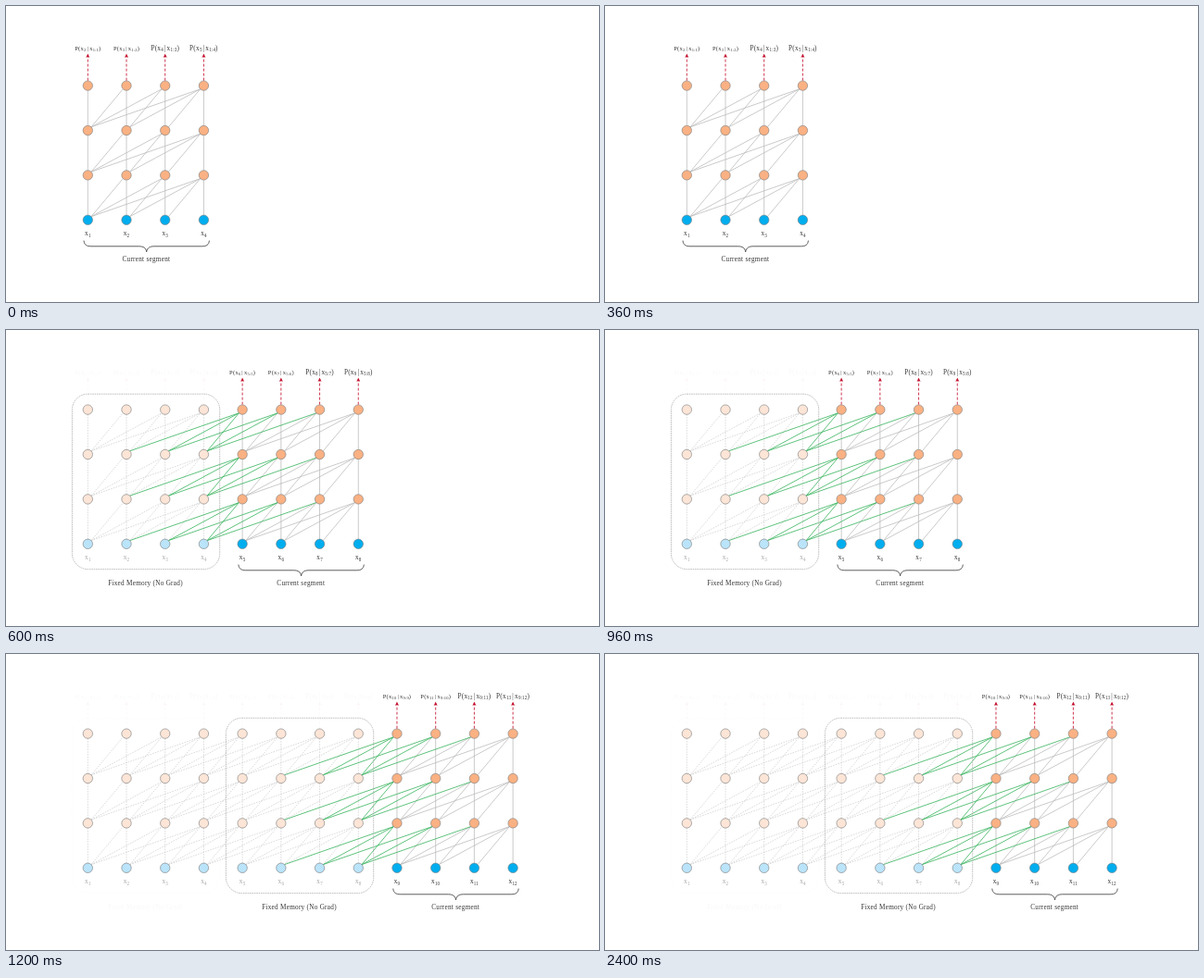
These frames come from a looping animation (640 by 320 pixels, 3.2 s). An HTML page:

```html
<!DOCTYPE html>
<html lang="en">
<head>
<meta charset="utf-8">
<title>Segment recurrence</title>
<style>
  html, body { margin: 0; width: 100%; height: 100%; overflow: hidden; background: #fff; }
  svg { display: block; width: 100vw; height: 100vh; }
  text { font-family: "Liberation Serif", "Times New Roman", serif; font-size: 7.2px; letter-spacing: .28px; fill: #333; text-anchor: middle; }
  .sub { font-size: 70%; letter-spacing: .15px; }
  .old { fill: #a6a6a6; }
  .ghost { opacity: .03; }
  path { fill: none; }
  .edge { stroke: #b9b9b9; stroke-width: .75; }
  .past { stroke: #c6c6c6; stroke-width: .65; stroke-dasharray: 1.6 1.2; }
  .memory { stroke: #37b35c; stroke-width: .8; }
  .arrow { stroke: #c4122f; stroke-width: .85; stroke-dasharray: 3 2; }
  .head { fill: #c4122f; }
  .brace { stroke: #333; stroke-width: .8; }
  .frame { fill: none; stroke: #aaa; stroke-width: .75; stroke-dasharray: 1.6 .8; }
  circle { stroke: #777; stroke-width: .6; }
</style>
</head>
<body>
<svg viewBox="0 0 640 320">
  <defs>
    <pattern id="paleInput" width="1.7" height="1.7" patternUnits="userSpaceOnUse" patternTransform="rotate(45)">
      <rect width="1.7" height="1.7" fill="#d4eefc"/><rect width="1.7" height=".8" fill="#9ed9f8"/>
    </pattern>
    <pattern id="paleHidden" width="1.7" height="1.7" patternUnits="userSpaceOnUse" patternTransform="rotate(45)">
      <rect width="1.7" height="1.7" fill="#feede2"/><rect width="1.7" height=".8" fill="#fbdcca"/>
    </pattern>
  </defs>
  <g id="scene"></g>
</svg>
<script>
  const SEGMENT = 4, REACH = 3, ROWS = 4, RADIUS = 5.2;
  const LOOP = 3200, STEP = 600;
  const scene = document.getElementById('scene');

  const colX = col => 88.3 + 41.71 * col;
  const rowY = row => 231.3 - 48.4 * row;
  const line = (cls, x1, y1, x2, y2) =>
    `<path class="${cls}" d="M${x1} ${y1}L${x2} ${y2}"/>`;
  const text = (x, y, body, attrs = '') => `<text x="${x}" y="${y}" ${attrs}>${body}</text>`;
  const sub = s => `<tspan class="sub" dy="1.3">${s}</tspan>`;

  function edges(start, count) {
    const diag = RADIUS * Math.SQRT1_2;
    let pale = '', plain = '', green = '';
    for (let row = 0; row < ROWS - 1; row++) {
      const y1 = rowY(row), y2 = rowY(row + 1);
      for (let to = 0; to < count; to++) {
        for (let from = Math.max(0, to - REACH); from <= to; from++) {
          const a = colX(from), b = colX(to);
          const draw = cls => from === to
            ? line(cls, a, y1 - RADIUS, b, y2 + RADIUS)
            : line(cls, a + diag, y1 - diag, b - diag, y2 + diag);
          if (to < start) pale += draw('past');
          else if (from < start) green += draw('memory');
          else plain += draw('edge');
        }
      }
    }
    return pale + plain + green;
  }

  function node(col, row, old) {
    const fill = row === 0
      ? (old ? 'url(#paleInput)' : '#00aeef')
      : (old ? 'url(#paleHidden)' : '#fab183');
    return `<circle cx="${colX(col)}" cy="${rowY(row)}" r="${RADIUS}" fill="${fill}"/>`;
  }

  function output(col, old) {
    const x = colX(col), slot = col % SEGMENT;
    const size = slot < 2 ? 6.5 : 7.2;
    const body = `P(x${sub(col + 2)}<tspan dx="1" dy="-1.3">|</tspan><tspan dx="1">x</tspan>` +
      `${sub(`${col - slot + 1}:${col + 1}`)}<tspan dy="-1.3">)</tspan>`;
    return `<g class="${old ? 'ghost' : ''}">` +
      text(x, 47.6, body, `style="font-size:${size}px"`) +
      line('arrow', x, 80.6, x, 55) +
      `<path class="head" d="M${x} 51.4l2 4.4l-2 -.9l-2 .9z"/></g>`;
  }

  function brace(segment) {
    const x = 84 + 166.9 * segment;
    return `<path class="brace" d="M${x} 253.6c.4 4.6 3 6.2 8 6.2h51.5c4.8 0 7.6 1.8 8.2 6` +
      `c.6 -4.2 3.4 -6 8.2 -6h51.5c5 0 7.6 -1.6 8 -6.2"/>` +
      text(x + 67.4, 275.8, 'Current segment');
  }

  function memoryBox(segment, old) {
    const x = 71.4 + 166 * segment;
    return `<g class="${old ? 'ghost' : ''}">` +
      `<rect class="frame" x="${x}" y="69.2" width="159.3" height="189.4" rx="17"/>` +
      text(x + 79.1, 275.8, 'Fixed Memory (No Grad)') + '</g>';
  }

  function render(step) {
    const start = step * SEGMENT, count = start + SEGMENT;
    let out = edges(start, count);
    for (let col = 0; col < count; col++) {
      const old = col < start;
      for (let row = 0; row < ROWS; row++) out += node(col, row, old);
      out += text(colX(col), 248.3, 'x' + sub(col + 1), old ? 'class="old"' : '');
      out += output(col, old);
    }
    for (let s = 0; s < step; s++) out += memoryBox(s, s < step - 1);
    scene.innerHTML = out + brace(step);
  }

  let shown = -1;
  const origin = performance.now();
  function update(now) {
    const t = Math.max(0, now - origin) % LOOP;
    const step = Math.min(2, Math.floor(t / STEP));
    if (step !== shown) render(shown = step);
    requestAnimationFrame(update);
  }
  update(origin);
</script>
</body>
</html>
```
